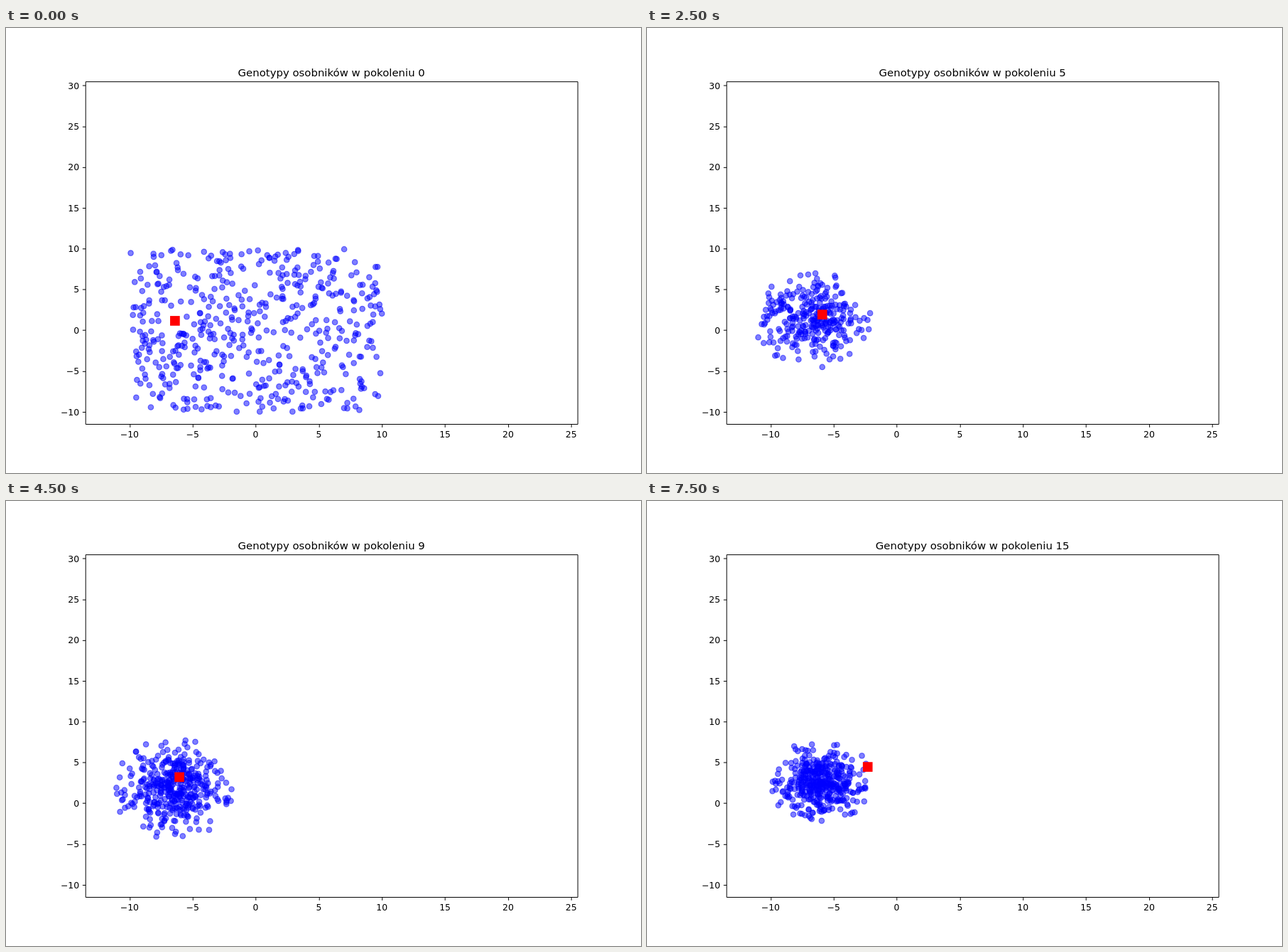
An HTML page that plays this animation: 894 by 626 pixels, repeating every 8000 ms.

```html
<!DOCTYPE html>
<html lang="pl">
<head>
<meta charset="utf-8">
<title>Genotypy</title>
<style>
  html, body { margin: 0; width: 100%; height: 100%; overflow: hidden; background: #fff; }
  svg { display: block; width: 894px; height: 626px; }
  text { font-family: "DejaVu Sans", sans-serif; font-size: 13.89px; fill: #000; }
  .title { font-size: 16.67px; text-anchor: middle; }
  .axes { fill: none; stroke: #000; stroke-width: 1.11; }
  .dots { fill: #00f; fill-opacity: .5; stroke: #00f; stroke-opacity: .5; stroke-width: 1.39; }
</style>
</head>
<body>
<svg id="stage" viewBox="0 0 1000 700"></svg>
<script>
const STEP = 500, GENERATIONS = 16, LAST = GENERATIONS - 1;
const BOX = { left: 125, right: 900, top: 84, bottom: 623 };
const stage = document.getElementById('stage');

function add(parent, tag, attrs, text) {
  const el = document.createElementNS('http://www.w3.org/2000/svg', tag);
  for (const name in attrs) el.setAttribute(name, attrs[name]);
  if (text !== undefined) el.textContent = text;
  return parent.appendChild(el);
}

// The axes span -13.5..25.5 across and -11.5..30.5 upwards.
const px = x => BOX.left + (x + 13.5) / 39 * (BOX.right - BOX.left);
const py = y => BOX.bottom - (y + 11.5) / 42 * (BOX.bottom - BOX.top);
const snap = v => Math.floor(v + .5) + .5;
const mix = (a, b, k) => a + (b - a) * k;
const label = v => String(v).replace('-', '\u2212');

function random(seed) {
  return () => {
    seed = seed + 0x6D2B79F5 | 0;
    let t = Math.imul(seed ^ seed >>> 15, 1 | seed);
    t = t + Math.imul(t ^ t >>> 7, 61 | t) ^ t;
    return ((t ^ t >>> 14) >>> 0) / 4294967296;
  };
}

// Generation 0 fills a square; later ones gather in a cloud that drifts up and right.
function population(gen) {
  const rnd = random(101 + gen * 977);
  if (!gen) return Array.from({ length: 500 }, () => [rnd() * 20 - 10, rnd() * 20 - 10]);
  const drift = (gen / LAST) ** 2, bulge = Math.sin(Math.PI * gen / LAST);
  return Array.from({ length: Math.min(410, 60 * gen) }, () => {
    const radius = Math.sqrt(-2 * Math.log(mix(.04, 1, rnd())));
    const angle = rnd() * 2 * Math.PI;
    return [
      -6.6 + .6 * drift ** 2 + (1.65 + .25 * bulge) * radius * Math.cos(angle),
      1.2 + 1.5 * drift + (2 + .5 * bulge) * radius * Math.sin(angle)
    ];
  });
}

// Key points of the best individual: generation, x, y.
const bestPath = [
  [0, -6.4, 1.15], [3, -5.9, 1.45], [6, -5.9, 2.15], [9, -6.05, 3.2],
  [11, -3.35, 3.55], [13, -3.15, 4.3], [15, -2.3, 4.45]
];

function best(gen) {
  const i = Math.max(1, bestPath.findIndex(p => p[0] >= gen));
  const [g0, x0, y0] = bestPath[i - 1], [g1, x1, y1] = bestPath[i];
  const k = (gen - g0) / (g1 - g0);
  return [mix(x0, x1, k), mix(y0, y1, k)];
}

const frames = Array.from({ length: GENERATIONS }, (_, gen) => {
  const group = add(stage, 'g', { display: 'none' });
  const dots = add(group, 'g', { class: 'dots' });
  for (const [x, y] of population(gen))
    add(dots, 'circle', { cx: px(x).toFixed(2), cy: py(y).toFixed(2), r: 4.17 });
  const [x, y] = best(gen), size = 15.3;
  add(group, 'rect', { x: px(x) - size / 2, y: py(y) - size / 2, width: size, height: size, fill: '#f00' });
  add(group, 'text', { class: 'title', x: 512.5, y: 75.7 }, 'Genotypy osobników w pokoleniu ' + gen);
  return group;
});

const left = snap(BOX.left), bottom = snap(BOX.bottom);
let axes = `M${left} ${snap(BOX.top)}H${snap(BOX.right)}V${bottom}H${left}Z`;
for (let v = -10; v <= 25; v += 5) {
  axes += `M${snap(px(v))} ${bottom}v4.86`;
  add(stage, 'text', { x: px(v), y: 644, 'text-anchor': 'middle' }, label(v));
}
for (let v = -10; v <= 30; v += 5) {
  axes += `M${left} ${snap(py(v))}h-4.86`;
  add(stage, 'text', { x: 115.3, y: py(v) + 5.3, 'text-anchor': 'end' }, label(v));
}
add(stage, 'path', { class: 'axes', d: axes });

let shown = -1;
function render(time) {
  const gen = Math.floor(time / STEP) % GENERATIONS;
  if (gen === shown) return;
  if (shown >= 0) frames[shown].setAttribute('display', 'none');
  frames[gen].removeAttribute('display');
  shown = gen;
}

const start = performance.now();
function tick() {
  render(performance.now() - start);
  requestAnimationFrame(tick);
}
tick();
</script>
</body>
</html>
```
